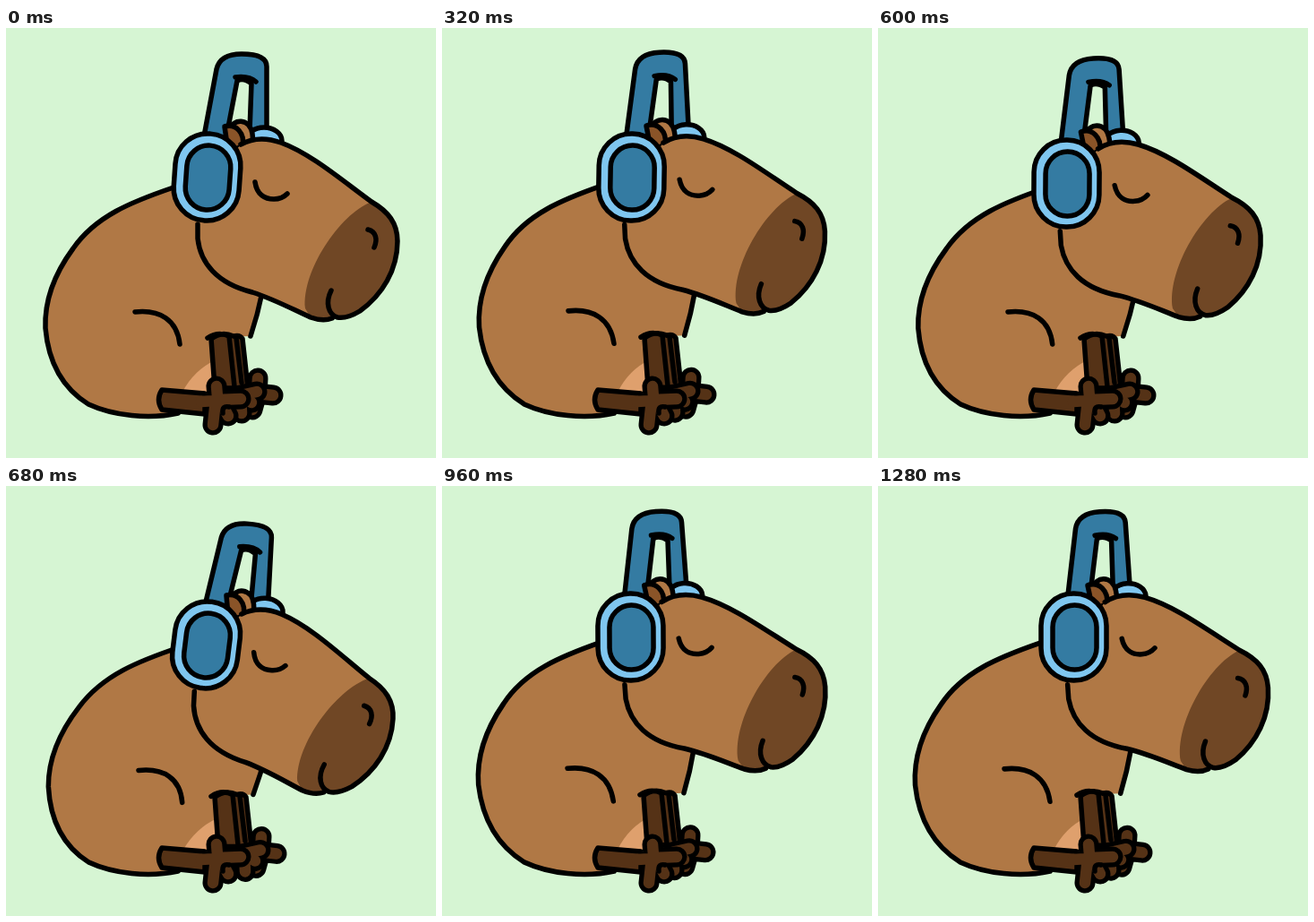
An HTML page that plays this animation: 480 px wide and 480 px high, repeating every 1360 ms.

```html
<!DOCTYPE html>
<html lang="en">
<head>
<meta charset="utf-8">
<title>Capybara with headphones</title>
<style>
  html, body { margin: 0; height: 100%; overflow: hidden; background: #d6f5d3; }
  svg { display: block; width: 100vw; height: 100vh; }
  path, rect, ellipse { stroke: #000; stroke-width: 5.5; stroke-linecap: round; stroke-linejoin: round; }
  .fur { fill: #b07845; }
  .leg { fill: #553216; }
  .blue { fill: #347ba2; }
  .sky { fill: #7fc6ef; }
  .line { fill: none; }
  .flat { stroke: none; }
  .rim { fill: none; stroke-width: 23; }
  .toe { fill: none; stroke: #553216; stroke-width: 12.5; }
</style>
</head>
<body>
<svg viewBox="0 0 480 480">
  <defs>
    <path id="backToes" d="M280 408L281 391M280 408L298 410M280 408L275 426"/>
    <path id="midToes" d="M262 410L280 406M262 410L263 430M262 410L274 418"/>
  </defs>

  <g id="body">
    <path class="fur flat" d="M222 166L187 178C140 194 100 210 75 246C50 280 43 310 44 335C47 370 60 400 92 420C120 433 160 437 192 430L238 400L240 345L274 344Q282 318 286 295L285 250Z"/>
    <path class="flat" fill="#dfa06d" d="M197 406Q210 382 233 371L238 406Z"/>
    <path class="line" d="M222 166L187 178C140 194 100 210 75 246C50 280 43 310 44 335C47 370 60 400 92 420C120 433 160 437 192 430M273 344Q281 320 286 295M144 317C172 314 191 326 194 353"/>
  </g>

  <g id="rear">
    <g id="back"></g>
    <path class="leg" d="M229 347L233 402L270 402L264 347Q261 342 254 344Q240 338 229 347Z"/>
    <path class="line" d="M225 346Q237 338 249 344L255 400M257 346L263 396"/>
    <g id="mid"></g>
  </g>

  <path class="leg" d="M174 404L222 408L222 431L174 426Q167 415 174 404Z"/>
  <path class="rim" d="M236 412L235 400M236 415L262 414M238 415L248 433M234 415L231 443"/>
  <path class="toe" stroke-width="12" d="M248 433L240 418"/>
  <path class="toe" d="M218 417L234 416M236 412L235 400M236 415L262 414M234 415L231 443"/>
  <path class="line" d="M242 430Q241 421 249 423"/>

  <g id="head">
    <path class="blue" d="M218 137L235 46Q239 29 263 29Q291 29 291 43L291 115L272 115L274 62Q265 55 258 59L243 137Z"/>
    <path class="line" d="M256 55Q271 53 279 60"/>
    <ellipse class="sky" cx="288" cy="126" rx="20" ry="15"/>
    <path class="fur" d="M250 113C253 101 272 100 275 118L276 128L256 136Z"/>
    <path fill="#8a5428" d="M244 110C257 106 267 118 264 132L248 138Z"/>
    <path class="fur flat" d="M225 175L214 218L214 235C217 262 235 285 275 295C300 303 320 314 340 323Q354 328 366 323Q380 326 395 316C420 298 437 270 437 238C437 218 427 205 408 194C375 170 340 140 307 128Q282 119 262 130Z"/>
    <path class="flat" fill="#704725" d="M408 194C372 208 330 272 334 313L340 323Q354 328 366 323Q380 326 395 316C420 298 437 270 437 238C437 218 427 205 408 194Z"/>
    <path class="line" d="M214 219L214 235C217 262 235 285 275 295C300 303 320 314 340 323Q354 328 364 324M363 293C356 307 360 320 370 323Q380 325 395 316C420 298 437 270 437 238C437 218 427 205 408 194C375 170 340 140 307 128Q282 119 262 130"/>
    <path class="line" d="M278 172C280 186 289 191 299 191Q308 191 314 185M404 225C413 227 415 236 411 245"/>
    <g transform="rotate(4 225 167)">
      <rect class="sky" x="188" y="118" width="73" height="97" rx="36"/>
      <rect class="blue" x="201" y="131" width="49" height="72" rx="24.5"/>
    </g>
  </g>
</svg>
<script>
  const $ = id => document.getElementById(id);
  const LOOP = 1360, CUP = [226, 167], FLOOR = 430;

  // start ms, cup x, cup y, head tilt, body lean, body stretch
  const poses = [
    [0, 226, 167, 0, 0, 0],
    [120, 236, 180, 5.5, 4, -.008],
    [200, 228, 177, 4, 3, -.005],
    [320, 213, 167, -3, -3, .01],
    [400, 203, 174, -15, -3.5, .03],
    [520, 206, 177, -11, -1, .02],
    [600, 212, 174, -3.6, 1, 0],
    [680, 225, 178, 3, 4, -.005],
    [800, 235, 186, 6.3, 5, -.01],
    [880, 226, 179, 3, 2, 0],
    [960, 212, 169, -4.3, -4, .015],
    [1080, 202, 179, -17.3, -3, .035],
    [1160, 210, 173, -11, -3, .02],
    [1280, 220, 169, -4, -3, .01]
  ];

  for (const id of ["back", "mid"])
    $(id).innerHTML = ["rim", "toe"].map(c => `<use href="#${id}Toes" class="${c}"/>`).join("");
  // Let the reused toes inherit their stroke from each use.
  for (const p of document.querySelectorAll("defs path"))
    p.style.cssText = "stroke: inherit; stroke-width: inherit";
  for (const u of document.querySelectorAll("use.rim")) u.style.stroke = "#000";
  for (const u of document.querySelectorAll("use")) u.style.strokeLinecap = "round";

  function draw(now) {
    const t = now % LOOP;
    const [, x, y, tilt, lean, stretch] = poses.findLast(p => p[0] <= t);
    const shear = lean / 114, sy = 1 + stretch;
    $("body").setAttribute("transform",
      `matrix(1 0 ${-shear} ${sy} ${shear * FLOOR} ${-stretch * FLOOR})`);
    $("rear").setAttribute("transform",
      `translate(${lean} ${-stretch * 85})`);
    $("head").setAttribute("transform",
      `translate(${x - CUP[0]} ${y - CUP[1]}) rotate(${tilt} ${CUP})`);
  }

  const start = performance.now();
  function tick() {
    draw(performance.now() - start);
    requestAnimationFrame(tick);
  }
  tick();
</script>
</body>
</html>
```
